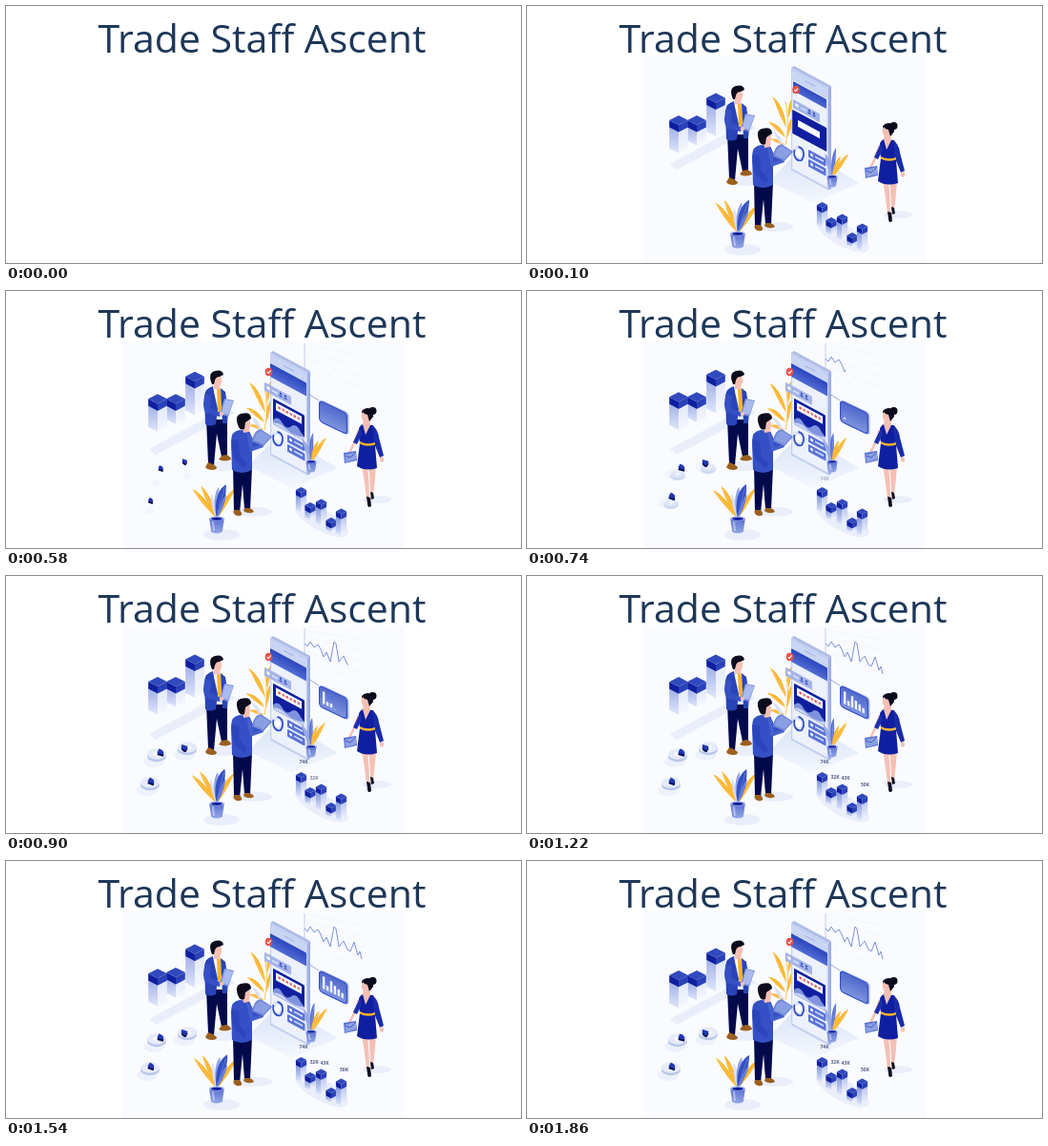
Recreate the animation shown at these times as an HTML page with a canvas. Size 540 px wide and 270 px high, loop 1.94 s.

```html
<!DOCTYPE html>
<html lang="en">
<head>
<meta charset="utf-8">
<title>Trade Staff Ascent</title>
<style>
html, body { margin: 0; width: 100%; height: 100%; overflow: hidden; background: #fff; }
canvas, svg { position: absolute; left: 0; top: 0; width: 540px; height: 270px; }
text { font: 41px "Open Sans", "Noto Sans", sans-serif; fill: #1d3759; text-anchor: middle; }
</style>
</head>
<body>
<canvas id="stage" width="540" height="270"></canvas>
<svg viewBox="0 0 540 270"><text x="268.5" y="48.5">Trade Staff Ascent</text></svg>
<script>
const ctx = document.getElementById('stage').getContext('2d');
const LOOP = 1940, BLANK = 100, STEP = 80;
const BLUE = '#3450c4', MID = '#5870d2', DEEP = '#0f1f9f', NAVY = '#030a4c',
      PALE = '#d5def6', MIST = '#edf1fb', LILAC = '#8da0e2', GOLD = '#fbb42b',
      SKIN = '#f5c0b4', HAIR = '#0b0b1d', RED = '#ea5148', BROWN = '#9c601f';

const clamp = v => Math.max(0, Math.min(1, v));
const mix = (a, b, p) => a + (b - a) * p;
const ease = p => p * p * (3 - 2 * p);
const span = (t, a, b) => ease(clamp((t - a) / (b - a)));

function fill(color, d) { ctx.fillStyle = color; ctx.fill(new Path2D(d)); }
function line(color, width, d) {
  ctx.strokeStyle = color;
  ctx.lineWidth = width;
  ctx.stroke(new Path2D(d));
}
function rect(color, x, y, w, h, r = 0) {
  ctx.fillStyle = color;
  ctx.beginPath();
  ctx.roundRect(x, y, w, h, r);
  ctx.fill();
}
function oval(color, x, y, rx, ry = rx, turn = 0) {
  ctx.fillStyle = color;
  ctx.beginPath();
  ctx.ellipse(x, y, rx, ry, turn, 0, 7);
  ctx.fill();
}
function fade(y0, y1, from, to) {
  const g = ctx.createLinearGradient(0, y0, 0, y1);
  g.addColorStop(0, from);
  g.addColorStop(1, to);
  return g;
}
// Draws in a sheared plane, like a wall seen from the right.
function wall(x, y, slope, draw) {
  ctx.save();
  ctx.transform(1, slope, 0, 1, x, y);
  draw();
  ctx.restore();
}

// Isometric column: a solid cap over a pale body; x, y is the top centre.
function column(x, y, w, cap, body, left, right) {
  const h = w * .52;
  const side = (dir, y0, len, color) =>
    fill(color, `M${x + dir * w} ${y0}L${x} ${y0 + h}v${len}L${x + dir * w} ${y0 + len}Z`);
  side(-1, y + cap, body, fade(y + cap, y + cap + body + h, left, '#dfe6fa'));
  side(1, y + cap, body, fade(y + cap, y + cap + body + h, right, '#f6f8fe'));
  side(-1, y, cap, DEEP);
  side(1, y, cap, '#2a41b8');
  fill('#3049bd', `M${x - w} ${y}L${x} ${y - h}L${x + w} ${y}L${x} ${y + h}Z`);
}

// A thin leaf; bend moves the tip sideways.
function leaf(x, y, len, angle, w, color, bend = 0) {
  ctx.save();
  ctx.translate(x, y);
  ctx.rotate(angle);
  fill(color, `M0 0C${-w} ${-len * .35} ${-w} ${-len * .8} ${bend} ${-len}C${w} ${-len * .75} ${w} ${-len * .3} 0 0Z`);
  line('rgba(255,255,255,.4)', .5, `M0 0Q0 ${-len * .5} ${bend * .8} ${-len * .9}`);
  ctx.restore();
}

function pot(x, y, w, h) {
  fill(fade(y, y + h, MID, LILAC), `M${x - w} ${y}L${x - w * .75} ${y + h}Q${x} ${y + h + 3} ${x + w * .75} ${y + h}L${x + w} ${y}Z`);
  fill('rgba(255,255,255,.4)', `M${x - w * .7} ${y + 3}l1.5 ${h - 4}h2l-1 ${4 - h}Z`);
  oval('#a9b7ea', x, y, w, w * .32);
  oval(DEEP, x, y + .4, w * .75, w * .2);
}

function leftColumns(t) {
  fill('#e9eefa', 'M150 166L231 122L240 128L157 172Z');
  [[198, 96.5, 28], [178, 120, 14], [159, 120, 22]].forEach(([x, y, body], i) => {
    const lift = 9 * (span(t, 100, 820) - span(t, 1180, 1840 - i * 80));
    column(x, y - lift, 9.8, 7.5, body, '#a3b2e8', '#e3e9fa');
  });
}

// Each slice settles from (dx, dy) while its ring rises from below.
function pies(t) {
  const parts = [[158, 187, 3, 2, 1, -.5], [190, 180, -2, -1, -2, 2.7], [151, 217, 0, 1, 8, -.4]];
  for (const [x, y, off, dx, dy, turn] of parts) {
    const p = span(t, 420, 760), q = span(t, 500, 900);
    ctx.globalAlpha = q;
    oval(MIST, x - 3, y + 8 * q, 11, 6);
    const r = mix(4, 10, q), ry = y + (1 - q) * 14;
    oval('#bac6eb', x, ry + 2.5, r, r * .58);
    oval('#e6ebf9', x, ry, r, r * .58);
    oval('#f9faff', x, ry, r * .4, r * .22);
    ctx.globalAlpha = clamp(p * 3);
    const size = mix(4, 7, p), cx = x + off + dx * (1 - p), cy = y - 1 + dy * (1 - p);
    const slice = (lower, color) => {
      ctx.fillStyle = color;
      ctx.beginPath();
      ctx.moveTo(cx - Math.cos(turn) * 3, cy + lower);
      ctx.ellipse(cx - Math.cos(turn) * 3, cy + lower, size, size * .65, 0, turn - .8, turn + .9);
      ctx.closePath();
      ctx.fill();
    };
    slice(2, NAVY);
    slice(0, '#2038b2');
  }
  ctx.globalAlpha = 1;
}

function backLeaves(sway) {
  line(GOLD, .8, 'M271 146Q276 124 271 100');
  [[272, 128, 36, -.36, 3, -4], [274, 118, 25, .1, 2.3, 3], [271, 138, 24, -.72, 2.8, -4],
   [273, 138, 26, .16, 2.2, 3], [270, 146, 16, -1.1, 2.2, -2]]
    .forEach(([x, y, len, a, w, bend]) => leaf(x, y, len, a + sway, w, GOLD, bend));
  leaf(268, 147, 18, -.5 + sway, 2.2, PALE, -2);
}

function device(t) {
  const p = span(t, 100, 520);
  fill(fade(156, 207, '#dae3f7', '#f4f7fd'), 'M277 160L254 184L300 207L348 186L318 168Z');
  fill('#aebce8', 'M277 65L280 63L319 84L316 86Z');
  fill('#9fafe6', 'M316 86L319 84V192L316 193.5Z');
  wall(277, 65, .54, () => {
    rect('#c3cff0', 0, 0, 39, 107.5, 1);
    rect('#edf1fc', 1.2, 3, 36.6, 102);
    rect('#c9d5f4', 1.2, 3, 36.6, 9);
    rect('#a9b8e8', 14, 5, 11, 1.5, .7);
    rect(fade(10, 26, '#2742bc', '#556fd4'), mix(2, 0, p), mix(13, 11, p), mix(35, 38, p), mix(10, 14, p), 1);

    const x = mix(2, -6, p), y = mix(32, 34, p);
    rect('#a5b4e8', x, y, 28, 9, 1);
    oval('#f1f4ff', x + 4, y + 4.2, 1.8);
    rect('#f1f4ff', x + 8, y + 4, 6, 1.2);
    for (const dx of [17, 22]) {
      oval(BLUE, x + dx, y + 3, 1.2);
      rect(BLUE, x + dx - 1.5, y + 4.8, 3, 1.4);
    }

    rect(DEEP, mix(1.2, 3, p), mix(43, 46, p), mix(36, 33, p), mix(25, 27, p), 1);
    rect('#f7f8ff', mix(7, 6, p), mix(51, 49, p), mix(23, 27, p), mix(7, 8, p));
    if (p > .5) {
      ctx.globalAlpha = (p - .5) * 2;
      for (let i = 0; i < 6; i++) rect(i % 2 ? '#d76c7d' : RED, 8.5 + i * 4, 51.5, 2.4, 2.4);
      fill('#7e92de', 'M3 73V69Q8 61 13 67Q18 72 23 64Q28 59 32 66L36 69V73Z');
      fill('#c9d4f4', 'M3 73V72Q10 67 17 71Q25 74 36 69V73Z');
      ctx.globalAlpha = 1;
    }
    for (const y of [76, 86]) {
      rect('#5a73d4', 18, y, 18.5, 8, 1);
      oval('#fff', 21.5, y + 4, 1.5);
      rect('#dce3fa', 25, y + 3, 9, 1.6);
    }
  });
  oval('#dce4f9', 284.5, 155, 6.5, 8, -.2);
  line(BLUE, 1.8, 'M284.5 148C290 149 292 156 288 162C283 164 279 158 280.5 151');
  oval('#fff', 284.5, 155, 3, 4, -.2);
  const bx = mix(282, 275.5, p), by = mix(88, 85, p);
  oval(RED, bx, by, 3.8, 4.3);
  line('#fff', 1.1, `M${bx - 1.8} ${by}l1.4 1.7l2.5 -3.3`);
}

function chart(t) {
  const grid = span(t, 340, 580);
  if (!grid) return;
  ctx.globalAlpha = grid;
  line('#b4c0e6', .8, 'M313 55V90');
  ctx.setLineDash([1, 2]);
  for (let i = 0; i < 5; i++) line('#dbe2f4', .7, `M313 ${56 + i * 7.5}l62 ${12 + i * 4}`);
  ctx.setLineDash([]);
  ctx.globalAlpha = 1;
  const end = mix(313, 374, clamp((t - 600) / 400));
  if (end <= 313) return;
  ctx.save();
  ctx.beginPath();
  ctx.rect(312, 50, end - 312, 65);
  ctx.clip();
  ctx.lineJoin = 'round';
  line('#7d90d6', 1, 'M313 71L316 74L319 69L323 75L327 72L330 77L333 85L336 80L340 90L344 69L346 71L349 90L354 84L358 93L361 95L365 85L369 99L371 95L373 103');
  ctx.restore();
}

function callout(t) {
  const p = span(t, 260, 540);
  if (!p) return;
  line('#8292d2', .8, 'M317 108L328 115');
  wall(328, 114, .48, () => {
    ctx.scale(p, p);
    rect('#a6b5e8', 1.5, -1, 30, 24, 4);
    rect(BLUE, 0, 0, 30, 23, 4);
    rect(fade(1, 22, '#5069cc', '#7e93de'), 1.2, 1.2, 27.6, 20.6, 3);
    const leave = span(t, 1620, 1860);
    [13, 5, 12, 9, 7, 5].forEach((h, i) => {
      const size = h * span(t, 700 + i * 60, 900 + i * 60) * (1 - leave);
      if (size > .2) rect('#f3f5ff', 4 + i * 3.9, 18 - size, 2.4, size);
    });
  });
}

function smallColumns(t) {
  ctx.save();
  oval('#e9eefa', 331, 241, 31, 11, .5);
  [[309.5, 209, 15], [319, 225, 7], [330.5, 221.5, 16], [341, 241, 4], [351.5, 231.5, 17]]
    .forEach(([x, y, body]) => column(x, y, 5.6, 5.5, body, '#8397de', '#b9c6f0'));
  ctx.font = 'bold 5px "Open Sans", sans-serif';
  ctx.textAlign = 'center';
  ctx.fillStyle = '#3a4270';
  [['74K', 312, 197], ['32K', 323, 213], ['43K', 334, 213.5], ['50K', 354.5, 221]].forEach(([s, x, y], i) => {
    const p = span(t, 640 + i * 110, 860 + i * 110);
    ctx.globalAlpha = p * .85;
    ctx.fillText(s, x, y + (1 - p) * 4);
  });
  ctx.restore();
}

function sidePlant(sway) {
  [[-.3, 26, 2.6, LILAC, -1], [.02, 31, 2.6, MID, 2], [.5, 30, 2.6, GOLD, 2], [.26, 24, 2.4, GOLD, 2]]
    .forEach(([a, len, w, c, bend]) => leaf(320, 180, len, a + sway, w, c, bend));
  pot(320, 179, 5.5, 10);
}

function frontPlant(sway) {
  oval('#e9eefa', 226, 256, 19, 6);
  [[-.62, 40, 3, GOLD, -2], [-.38, 38, 3.2, GOLD, -2], [-.2, 27, 2.5, PALE, 0], [.02, 33, 3.5, LILAC, 2],
   [.2, 37, 5.5, BLUE, 3], [.5, 37, 3, GOLD, 3], [.36, 27, 2.5, MID, 1]]
    .forEach(([a, len, w, c, bend]) => leaf(221, 239, len, a + sway, w, c, bend));
  pot(221, 239, 7.8, 14);
}

function presenter() {
  oval('#e9eefa', 228, 184, 18, 5);
  fill(NAVY, 'M210 135L212 181L218 183L221 150L226 174L232 173L232 135Z');
  fill(BROWN, 'M212 180L209 185Q211 188 216 188Q221 188 221 185L217 182ZM226 173L223 177Q229 180 236 177Q236 174 231 172Z');
  fill('#f7f8ff', 'M217 101L227 102L228 128L219 129Z');
  fill(GOLD, 'M221 102L224.5 102L227 125L224 128L222 125Z');
  fill('#2844b6', 'M217 100Q209 102 208 110L209 140Q214 143 220 140L222 124L218 106ZM225 102L230 106L233 126L232 139L227 139L226 120Z');
  fill(BLUE, 'M209 108Q205 119 209 128L224 132L226 128L214 123L215 110Z');
  fill(SKIN, 'M218 95L225 95L224 103L218 103Z');
  oval(SKIN, 221.8, 94, 4.4, 6);
  fill(HAIR, 'M216 98Q211 86 219 84Q227 82 228 88L224 90Q220 90 219 94L218 98Z');
  fill('#7f95de', 'M229 113L239 115L233 132L224 129Z');
  fill('#a9baee', 'M230 114L238 116L233 130L226 128Z');
  oval(SKIN, 226, 129, 2.4, 1.9);
}

function viewer() {
  oval('#e9eefa', 260, 232, 19, 5);
  fill(NAVY, 'M238 184L239 231L245 233L248 203L250 229L256 230L258 185Z');
  fill(BROWN, 'M239 230Q237 234 242 236Q248 237 247 233L245 230ZM250 228L249 231Q254 235 260 232Q259 229 255 228Z');
  fill(BLUE, 'M245 146Q236 147 236 158L237 188Q247 194 258 188L258 167L268 163L271 157L260 158L255 147Z');
  fill('#2b46ba', 'M237 156Q235 167 240 177L250 186L253 182L245 172L244 158Z');
  fill('#4560cd', 'M252 148L257 152L259 164L269 161L270 164L256 169Z');
  oval(SKIN, 270, 158, 2.5, 2.1);
  fill('#6f86d8', 'M258 158Q259 147 267 145L279 153L270 163Z');
  fill('#8a9ee3', 'M260 157Q261 149 267 147L277 153L270 161Z');
  fill(SKIN, 'M248 141L256 139L255 148L249 149Z');
  oval(SKIN, 251, 139, 5, 6.3);
  fill(HAIR, 'M244 143Q239 131 246 129Q257 126 257 134L254 136L251 138L250 145Q246 147 244 143Z');
}

function woman() {
  oval('#e9eefa', 389, 219, 15, 4);
  fill(SKIN, 'M373 183L379 183Q381 200 381 218L378 218Q376 200 373 183ZM380 183L388 184Q387 200 385 214L382 214Q382 200 380 183Z');
  fill(HAIR, 'M378 216L382 217L383 226Q379 229 379 223ZM382 211L385 212L386 218L383 219Z');
  line(SKIN, 2.6, 'M370 146L365 160L360 170');
  fill(MID, 'M354 170L367 168L368 178L355 181Z');
  fill(LILAC, 'M355 172L367 169L367 177L356 180Z');
  line(BLUE, .8, 'M355 173L361 175L367 169');
  fill(DEEP, 'M374 140Q369 142 370 150L371 160L368 184Q377 190 389 186L387 162L388 150L385 141Z');
  fill('#192ca9', 'M384 141Q390 145 391 154L396 173L392 175L386 160Z');
  fill('#1b2fae', 'M371 144L364 159L368 161L373 151Z');
  oval(SKIN, 394, 177, 2.1, 2.8);
  fill(GOLD, 'M371 158Q378 162 387 159L387 161.5Q378 164.5 371 160.5Z');
  fill(SKIN, 'M375 133L381 133L382 141L377 151L374 140Z');
  oval(SKIN, 377, 131.5, 4.3, 5.7);
  fill(HAIR, 'M373 129Q372 124 379 123Q386 123 385 132L381 137L379 130Q376 130 374 127Z');
  oval(HAIR, 384.5, 126, 4, 4);
}

function draw(now) {
  const time = now % LOOP;
  ctx.clearRect(0, 0, 540, 270);
  if (time < BLANK) return;
  const t = BLANK + Math.floor((time - BLANK) / STEP) * STEP;
  const phase = (t - BLANK) / (LOOP - BLANK);
  const sway = -.05 * Math.sin((phase - .2) * Math.PI * 2);
  rect('#fafbff', 122, 52, 296, 218);
  leftColumns(t);
  pies(t);
  chart(t);
  backLeaves(sway);
  device(t);
  callout(t);
  sidePlant(sway);
  smallColumns(t);
  presenter();
  frontPlant(sway);
  viewer();
  woman();
}
function tick() {
  draw(performance.now());
  requestAnimationFrame(tick);
}
tick();
</script>
</body>
</html>
```
